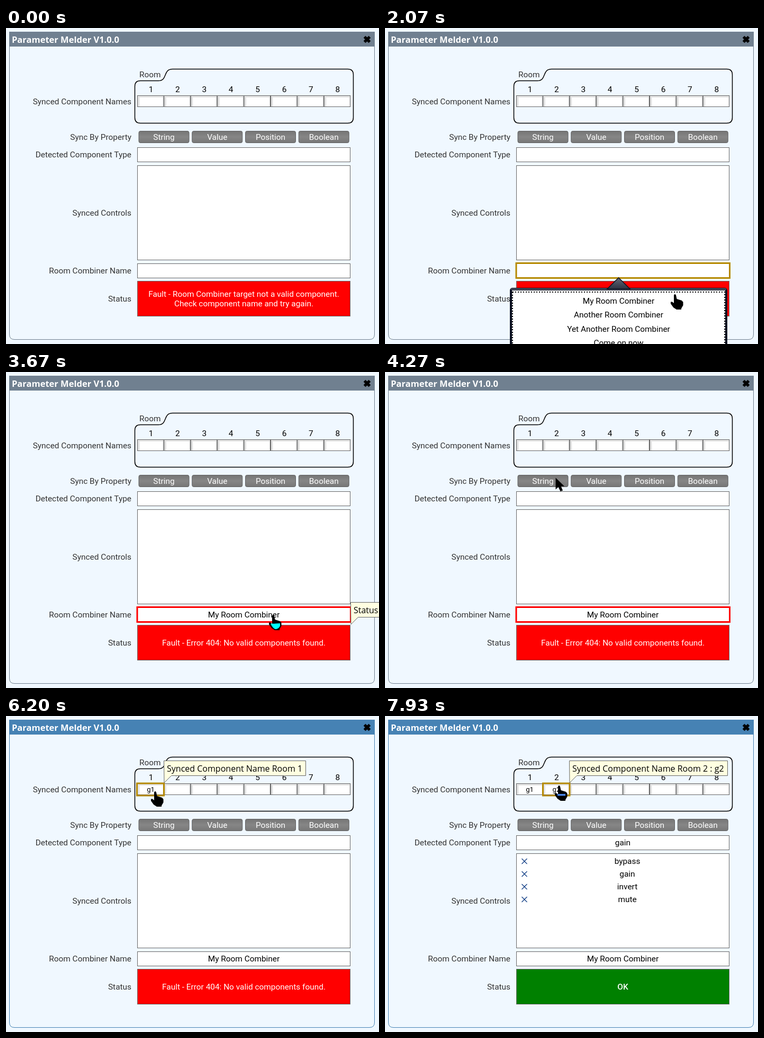
An HTML page for the animation above (8 s loop, 705 px wide and 596 px high).

```html
<!DOCTYPE html>
<html lang="en">
<head>
<meta charset="utf-8">
<title>Parameter Melder</title>
<style>
  html, body { margin: 0; width: 100%; height: 100%; overflow: hidden; background: #f0f8ff; }
  svg { display: block; font: 15.4px Roboto, sans-serif; }
  .title { font: bold 16.5px "Open Sans", sans-serif; fill: #fff; }
  .tip { font: 16px "Open Sans", sans-serif; }
  .small { font-size: 13px; }
  .label { fill: #333; }
  .white { fill: #fff; }
</style>
</head>
<body>
<svg id="stage" width="705" height="596" viewBox="0 0 705 596">
  <defs>
    <linearGradient id="btn" x2="0" y2="1">
      <stop stop-color="#757575"/><stop offset=".5" stop-color="#868686"/><stop offset="1" stop-color="#777"/>
    </linearGradient>
    <linearGradient id="peak" x2="0" y2="1">
      <stop stop-color="#646a78"/><stop offset="1" stop-color="#2c3242"/>
    </linearGradient>
  </defs>
  <g id="back"></g>
  <g id="live"></g>
</svg>
<script>
const LOOP = 8000, TICK = 200 / 3;
const GOLD = '#b58900', LIME = '#78cf2c', RED = '#f00';
const CELL_W = 50.4;

const text = (s, x, y, cls = '', anchor = 'middle') =>
  `<text x="${x}" y="${y}" class="${cls}" text-anchor="${anchor}">${s}</text>`;
const box = (x, y, w, h, fill, stroke = 'none', more = '') =>
  `<rect x="${x}" y="${y}" width="${w}" height="${h}" fill="${fill}" stroke="${stroke}" ${more}/>`;
const path = (d, fill, more = '') => `<path d="${d}" fill="${fill}" ${more}/>`;
const within = (k, a, b) => k >= a && k < b;

// Value of the last [tick, value] step reached
const step = (k, steps) => steps.reduce((v, [at, next]) => k >= at ? next : v, '');

function backdrop() {
  let s = '';
  const labels = [['Synced Component Names', 144], ['Sync By Property', 211],
    ['Detected Component Type', 244], ['Synced Controls', 354],
    ['Room Combiner Name', 463], ['Status', 516]];
  for (const [name, y] of labels) s += text(name, 237, y, 'label', 'end');
  s += text('Room', 252, 93, 'label', 'start');
  s += path('M243.5 110Q243.5 99.5 254 99.5H288C306 99.5 296 77.5 315 77.5H646Q656.5 77.5 656.5 88' +
    'V169Q656.5 179.5 646 179.5H254Q243.5 179.5 243.5 169Z', 'none', 'stroke="#000" stroke-width="1.5"');
  for (let i = 0; i < 8; i++) {
    const x = 248.5 + CELL_W * i;
    s += text(i + 1, x + 25.5, 121);
    s += box(x, 127.5, 49.4, 21, '#e3e3e3', '#666') + box(x + 4, 131, 44, 17, '#fff');
  }
  ['String', 'Value', 'Position', 'Boolean'].forEach((name, i) => {
    const x = 251 + 100.75 * i;
    s += box(x, 194.5, 95, 22, 'url(#btn)', '#606060', 'rx="3"') + text(name, x + 47.5, 211, 'white');
  });
  for (const [y, h] of [[225.5, 27], [259.5, 178], [444.5, 27]])
    s += box(248.5, y, 402, h, '#fff', '#666');
  return s;
}

function frameWindow(active) {
  const c = active ? '#4682b4' : '#708090';
  return path('M6.5 20V578Q6.5 587.5 16 587.5H687Q696.5 587.5 696.5 578V20', 'none', `stroke="${c}"`) +
    box(6, 7, 691, 28, c) + text('Parameter Melder V1.0.0', 11, 28, 'title', 'start') +
    path('M677.6 16.6l9.8 9.8m0 -9.8l-9.8 9.8', 'none', 'stroke="#000" stroke-width="5.4"');
}

function status(k) {
  const ok = k >= 118;
  let s = box(248.5, 477.5, 402, 66, ok ? '#008000' : RED, '#666');
  if (k < 45) {
    return s + text('Fault - Room Combiner target not a valid component.', 449.5, 507, 'white') +
      text('Check component name and try again.', 449.5, 525, 'white');
  }
  if (ok) return s + `<g font-weight="500">${text('OK', 449.5, 516, 'white')}</g>`;
  return s + text(k < 95 ? 'Fault - Error 404: No valid components found.'
    : 'Fault - Only one valid component specified.', 449.5, 516, 'white');
}

function fields(k) {
  let s = '';
  if (k >= 44) s += text('My Room Combiner', 449.5, 463);
  const names = [step(k, [[88, 'g'], [90, 'g1']]), step(k, [[113, 'g'], [115, 'g2']])];
  const caret = [within(k, 72, 80) || within(k, 88, 93), within(k, 110, 117)];
  names.forEach((name, i) => {
    const x = 273.5 + CELL_W * i;
    s += text(name, x, 143, 'small');
    if (caret[i]) s += box(Math.floor(x + name.length * 3.65), 130, 1, 16, '#000');
  });
  if (k >= 118) {
    s += text('gain', 449.5, 244);
    ['bypass', 'gain', 'invert', 'mute'].forEach((name, i) => {
      const y = 274 + 24 * i;
      s += text(name, 458, y + 5) +
        path(`M258.5 ${y - 5}l10 10m0 -10l-10 10`, 'none', 'stroke="#123f86" stroke-width="1.3"');
    });
  }
  return s;
}

function focusRings(k) {
  const ring = (x, y, w, h, steps) => {
    const c = step(k, steps);
    return c ? box(x, y, w, h, 'none', c, 'stroke-width="3"') : '';
  };
  return ring(248, 443.5, 403.5, 28, [[8, LIME], [18, GOLD], [45, RED], [71, '']]) +
    ring(247.5, 127, 51, 23, [[65, LIME], [71, GOLD], [102, RED], [109, '']]) +
    ring(298.5, 127, 50.5, 23, [[102, LIME], [109, GOLD]]);
}

function popup(k) {
  const alpha = step(k, [[19, .33], [20, .67], [21, 1], [44, .67], [45, .33], [46, 0]]);
  if (!alpha) return '';
  let s = box(236, 490, 411, 130, '#0b1020', 'none', 'rx="5"') +
    box(238, 491, 407, 3, '#4a5060', 'none', 'rx="1.5"') +
    path('M420 492L441.5 471L463 492Z', 'url(#peak)', 'stroke="#0b1020" stroke-width="1.5"') +
    box(240, 495, 403, 120, '#fff');
  if (within(k, 33, 44)) s += box(244, 502, 395, 26, '#d3e6f6');
  s += box(241, 498, 401, 120, 'none', '#000', 'stroke-width="2" stroke-dasharray="2 3"');
  ['My Room Combiner', 'Another Room Combiner', 'Yet Another Room Combiner', 'Come on now']
    .forEach((name, i) => s += text(name, 441.5, 520 + 26.3 * i));
  return `<g opacity="${alpha}">${s}</g>`;
}

function tooltip(k) {
  const tip = (x, y, w, s) =>
    path(`M${x + .5} ${y + .5}h${w}v28h${14 - w}l-13.5 13.5Z`, '#ffffe1', 'stroke="#666"') +
    text(s, x + 6, y + 21, 'tip', 'start');
  const room = 'Synced Component Name Room ';
  if (within(k, 9, 19)) return tip(651, 401, 170, 'Room Combiner Name');
  if (within(k, 47, 56)) return tip(651, 434, 58, 'Status');
  if (within(k, 66, 94)) return tip(298, 84, 268, room + 1);
  if (within(k, 94, 102)) return tip(298, 84, 299, room + '1 : g1');
  if (within(k, 103, 119)) return tip(348, 84, 268, room + 2);
  return k >= 119 ? tip(348, 84, 299, room + '2 : g2') : '';
}

const ROUTE = [[4, 692, 512], [10, 614.5, 453.5], [25, 614.5, 453.5], [31, 548, 502], [36, 510, 513],
  [54, 510, 513], [55, 505, 458], [66, 282, 142], [100, 282, 142], [104, 329, 131], [120, 329, 131]];

function pointer(k) {
  if (k < 4) return '';
  const i = ROUTE.findIndex(p => p[0] > k), a = ROUTE[i - 1], b = ROUTE[i];
  const u = (k - a[0]) / (b[0] - a[0]);
  const x = a[1] + (b[1] - a[1]) * u, y = a[2] + (b[2] - a[2]) * u;
  const shape = step(k, [[4, 'arrow'], [8, 'hand'], [18, 'arrow'], [30, 'hand'], [47, 'arrow'],
    [55, 'hand'], [56, 'arrow'], [65, 'hand'], [72, 'beam'], [93, 'hand'], [110, 'beam'], [117, 'hand']]);
  let s;
  if (shape === 'arrow') s = path('M0 0V22L5 17.5L9 25.5L13.5 24L10 16H16.5Z', '#000');
  else if (shape === 'beam') s = path('M-6 -10H5M-6 10H5M-.5 -10V10', 'none', 'stroke="#000" stroke-width="2.6"');
  else {
    s = path('M-2 2Q0 -2 2 2L3.5 9L13 12L15.5 15V21L12 27V29H3L-3 25L-8 18V14.5H-5L-2 17Z', '#000');
    if (k === 55) s += path('M-5 17L13 16V21Q10 27 4 27Q0 26 -5 17Z', '#0ff');
    if (within(k, 104, 109)) s += box(-5, 18, 17, 1.5, '#7a2fa8');
    if (k === 119) s += box(-3, 16, 15, 3.5, '#4a86e8');
  }
  return `<g transform="translate(${x} ${y})">${s}</g>`;
}

const live = document.getElementById('live');
document.getElementById('back').innerHTML = backdrop();
let shown = -1;

function draw(now) {
  const k = Math.floor((now % LOOP + 4) / TICK) % 120;
  if (k !== shown) {
    shown = k;
    const active = k === 18 || k === 71 || within(k, 93, 110) || k >= 117;
    live.innerHTML = frameWindow(active) + status(k) + fields(k) + focusRings(k) +
      popup(k) + tooltip(k) + pointer(k);
  }
  requestAnimationFrame(draw);
}
draw(0);
</script>
</body>
</html>
```
